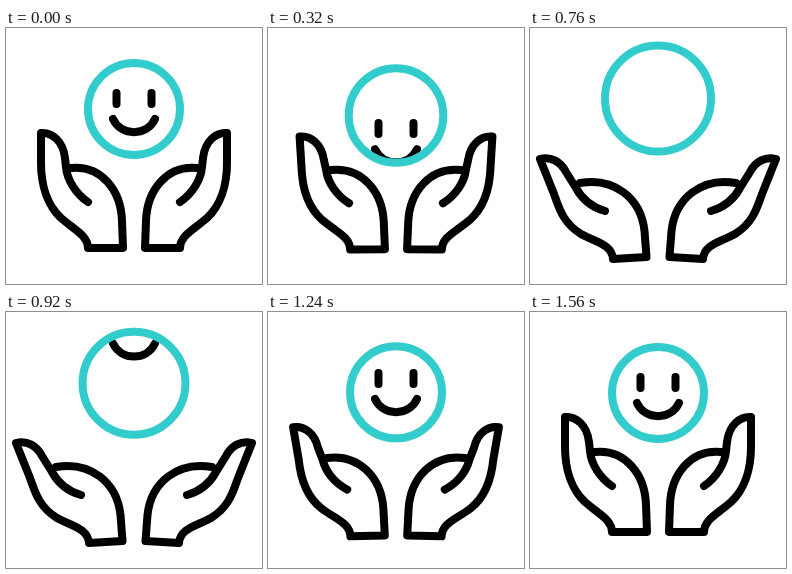
Animation, 256 px wide and 256 px high, one loop 1.72 s. Source, as an HTML page:

```html
<!DOCTYPE html>
<html lang="en">
<head>
<meta charset="utf-8">
<title>Caring hands</title>
<style>
  html, body { margin: 0; width: 100%; height: 100%; overflow: hidden; background: #fff; }
  svg { display: block; width: 100%; height: 100%; }
</style>
</head>
<body>
<svg viewBox="0 0 256 256" fill="none" stroke="#000" stroke-width="8" stroke-linecap="round" stroke-linejoin="round">
  <clipPath id="inside"><circle class="ball" cx="128"/></clipPath>
  <g clip-path="url(#inside)">
    <path id="face" d="M110.5 65V76M145.5 65V76M107 91C115 108.5 141 108.5 149 91"/>
  </g>
  <circle class="ball" cx="128" stroke="#33cccc"/>
  <path class="hand"/>
  <path class="hand" transform="matrix(-1 0 0 1 256 0)"/>
</svg>
<script>
const LOOP = 1720, STEP = 40;

// Palm, wrist, outer side, fingertip and thumb crease of the left hand.
const closedHand = 'M65 140C95 137 115 162 116 193L117 220L82 220C82 208 70 203 55 190C42 178 35 158 35 135L35 105C46 104 57 113 59 130L60 139C61 152 70 166 82 174';
const openHand = 'M50 155C84 149 111 170 114.5 203L116.5 229L83 231C82 216 65 214 51 206C33 195 29 180 24 166L10 131C21 128 31 134 36 144L46 160C52 171 61 179 75 183';
const openValues = openHand.match(/[\d.]+/g).map(Number);

function ease(t, from, to) {
  const u = Math.min(1, Math.max(0, (t - from) / (to - from)));
  return u * u * (3 - 2 * u);
}

const openness = t => ease(t, 190, 750) - ease(t, 955, 1455);
const ballRadius = t => 46 + 7 * (ease(t, 220, 580) - ease(t, 780, 1240));
const ballY = t => 81 + 8.5 * ease(t, 40, 450) - 19.7 * ease(t, 450, 800) + 11.2 * ease(t, 800, 1320);

// The face speeds up out of the bottom, then slows down coming in from the top.
const faceShift = t => t < 700
  ? 64 * (Math.max(0, t - 40) / 480) ** 1.4
  : -22 * (Math.max(0, 1400 - t) / 320) ** 2.46;

function handPath(amount) {
  let i = 0;
  return closedHand.replace(/[\d.]+/g, n => (+n + (openValues[i++] - n) * amount).toFixed(2));
}

const balls = document.querySelectorAll('.ball');
const hands = document.querySelectorAll('.hand');
const face = document.getElementById('face');

function draw(now) {
  const t = Math.floor(now % LOOP / STEP) * STEP;
  const path = handPath(openness(t));
  for (const hand of hands) hand.setAttribute('d', path);
  for (const ball of balls) {
    ball.setAttribute('cy', ballY(t));
    ball.setAttribute('r', ballRadius(t));
  }
  face.setAttribute('transform', `translate(0 ${faceShift(t)})`);
}

const start = performance.now();
function frame() {
  draw(performance.now() - start);
  requestAnimationFrame(frame);
}
frame();
</script>
</body>
</html>
```
